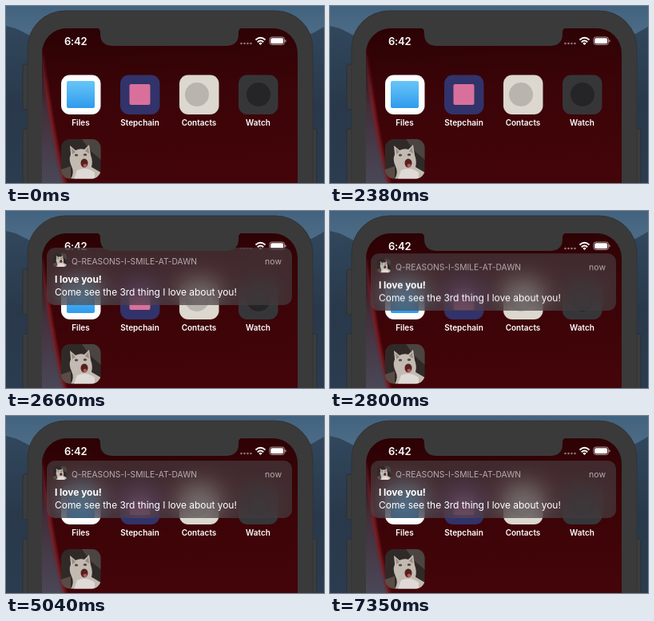
These frames come from a looping animation (398 px wide and 222 px high, 7.42 s). An HTML page:

```html
<!DOCTYPE html>
<html lang="en">
<head>
<meta charset="utf-8">
<title>Phone notification</title>
<style>
  html, body { margin: 0; width: 100%; height: 100%; overflow: hidden; background: #2c4258; }
  .stage { position: relative; width: 398px; height: 222px; overflow: hidden; font-family: Inter, "Liberation Sans", sans-serif; }
  .layer { position: absolute; left: 0; top: 0; width: 398px; height: 222px; display: block; }
  .screen { clip-path: inset(28px 33px 0 45px round 31px 31px 0 0); }
  .label { font-size: 10px; font-weight: 600; fill: #fff; text-anchor: middle; }
  .clock { font-size: 13px; font-weight: 600; fill: #fff; letter-spacing: -.2px; }

  .card {
    position: absolute; left: 51px; top: 56px; width: 307px; height: 72px;
    border-radius: 10px; overflow: hidden; color: #fff;
    background: rgba(70, 66, 69, .63);
    backdrop-filter: blur(15px) saturate(1.2);
    animation: drop 7420ms step-end infinite;
  }
  .card svg { position: absolute; left: 8px; top: 7px; width: 17px; height: 17px; border-radius: 4px; }
  .card span { position: absolute; white-space: pre; line-height: 16px; }
  .app, .when { color: #b3adb0; }
  .app { left: 31px; top: 9px; font-size: 10.3px; }
  .when { right: 13px; top: 10px; font-size: 10.5px; }
  .head { left: 10px; top: 32px; font-size: 12px; font-weight: 700; letter-spacing: -.06px; }
  .text { left: 10px; top: 48px; font-size: 12px; letter-spacing: -.04px; }

  /* decaying slide, one stop every 70 ms */
  @keyframes drop {
    0% { transform: translateY(-130px); }
    33.01% { transform: translateY(-68px); }
    33.96% { transform: translateY(-36px); }
    34.90% { transform: translateY(-19px); }
    35.84% { transform: translateY(-10px); }
    36.79% { transform: translateY(-5.3px); }
    37.73% { transform: translateY(-2.8px); }
    38.67% { transform: translateY(-1.5px); }
    39.62% { transform: translateY(-.8px); }
    40.56% { transform: translateY(-.4px); }
    41.50%, 100% { transform: none; }
  }
</style>
</head>
<body>
<div class="stage">

  <svg class="layer" viewBox="0 0 398 222">
    <defs>
      <linearGradient id="sky" x2="0" y2="1">
        <stop offset="0" stop-color="#42637f"/>
        <stop offset=".14" stop-color="#4b6a85"/>
        <stop offset="1" stop-color="#34465a"/>
      </linearGradient>
      <linearGradient id="hill" x2="0" y2="1">
        <stop offset="0" stop-color="#31475c"/>
        <stop offset=".5" stop-color="#29394b"/>
        <stop offset="1" stop-color="#2c3c50"/>
      </linearGradient>
    </defs>
    <rect width="398" height="222" fill="url(#sky)"/>
    <path d="M0 25L12 28L28 36L40 44V222H0Z" fill="url(#hill)"/>
    <path d="M370 40L384 34L398 26V222H370Z" fill="url(#hill)"/>
    <g fill="#3b3c3e" stroke="#2a2c2f" stroke-width=".8">
      <rect x="21" y="73" width="10" height="57" rx="2"/>
      <rect x="21" y="154" width="10" height="80" rx="2"/>
      <rect x="380" y="154" width="9" height="80" rx="2"/>
    </g>
    <rect x="27" y="6" width="357" height="260" rx="47" fill="#3a3a3b" stroke="#313335"/>
  </svg>

  <div class="layer screen">
    <svg class="layer" viewBox="0 0 398 222">
      <defs>
        <linearGradient id="wall" x2=".1" y2="1">
          <stop offset=".12" stop-color="#2b0204"/>
          <stop offset=".5" stop-color="#3a0408"/>
          <stop offset="1" stop-color="#430509"/>
        </linearGradient>
        <linearGradient id="slate" x2="0" y2="1">
          <stop offset="0" stop-color="#2c0b10"/>
          <stop offset=".45" stop-color="#432f3a"/>
          <stop offset="1" stop-color="#4a4757"/>
        </linearGradient>
        <linearGradient id="glow" x2="0" y2="1">
          <stop offset="0" stop-color="#801a20" stop-opacity="0"/>
          <stop offset=".4" stop-color="#801a20"/>
          <stop offset="1" stop-color="#7a1a20"/>
        </linearGradient>
        <linearGradient id="blue" x2="0" y2="1">
          <stop offset="0" stop-color="#68c5f8"/>
          <stop offset="1" stop-color="#2f9bee"/>
        </linearGradient>
        <filter id="soft" x="-1" width="3"><feGaussianBlur stdDeviation="1.5"/></filter>
        <symbol id="cat" viewBox="0 0 50 50">
          <rect width="50" height="50" fill="#2f2a28"/>
          <path d="M26 0H50V26L36 14Z" fill="#4b4440"/>
          <path d="M0 38L12 34V50H0Z" fill="#5a4c45"/>
          <path d="M11 8L18 14Q24 11 29 13L35 7L37 20Q40 28 38 35L50 42V50H12Q17 42 13 34Q9 26 12 19Z" fill="#c3bab2"/>
          <path d="M13 11L18 16L14 19ZM34 10L30 15L35 18Z" fill="#9c8b84"/>
          <path d="M20 39Q32 34 42 42V50H16Z" fill="#dfdad6"/>
          <ellipse cx="19" cy="20" rx="2.2" ry="1.5" fill="#4d4b45"/>
          <ellipse cx="30" cy="19.500" rx="2.2" ry="1.500" fill="#4d4b45"/>
          <ellipse cx="29" cy="30" rx="4.500" ry="5.500" fill="#55211f"/>
          <ellipse cx="30" cy="33" rx="2.500" ry="2" fill="#b25a58"/>
        </symbol>
        <clipPath id="photo"><rect x="69" y="167" width="49.500" height="49.500" rx="11"/></clipPath>
      </defs>

      <rect width="398" height="222" fill="url(#wall)"/>
      <path d="M45 50Q53 140 73 222H45Z" fill="url(#slate)"/>
      <path d="M45 50Q53 140 74 224" fill="none" stroke="url(#glow)" stroke-width="4" filter="url(#soft)"/>

      <text class="clock" x="73" y="49">6:42</text>
      <g fill="#8d7478">
        <circle cx="294.500" cy="47" r="1.300"/><circle cx="298.500" cy="47" r="1.300"/>
        <circle cx="302.500" cy="47" r="1.300"/><circle cx="306.500" cy="47" r="1.300"/>
      </g>
      <g fill="none" stroke="#fff" stroke-width="2">
        <path d="M312.500 42.500Q318.500 37 324.500 42.500"/>
        <path d="M314.800 45.200Q318.500 41.800 322.200 45.200"/>
      </g>
      <path d="M316.300 46.700Q318.500 45 320.700 46.700L318.500 49Z" fill="#fff"/>
      <rect x="330" y="39" width="18.500" height="9.500" rx="2.800" fill="none" stroke="#b9a4a6" stroke-width=".9"/>
      <rect x="331.300" y="40.300" width="15.900" height="6.900" rx="1.700" fill="#fff"/>
      <rect x="349.300" y="42.300" width="1.200" height="3" rx=".6" fill="#b9a4a6"/>

      <rect x="69" y="86.500" width="49.500" height="49.500" rx="11" fill="#fdfdfd"/>
      <rect x="76" y="94" width="35" height="34" rx="2" fill="url(#blue)"/>
      <rect x="143" y="86.500" width="49.500" height="49.500" rx="11" fill="#31336a"/>
      <rect x="154.500" y="98" width="26" height="26" rx="2" fill="#d8709b"/>
      <rect x="217" y="86.500" width="49.500" height="49.500" rx="11" fill="#dcd7cf"/>
      <circle cx="239" cy="111" r="15" fill="#b9b4ad"/>
      <rect x="291" y="86.500" width="49.500" height="49.500" rx="11" fill="#363638"/>
      <circle cx="316" cy="111" r="15" fill="#252527"/>
      <g clip-path="url(#photo)"><use href="#cat" x="69" y="167" width="50" height="50"/></g>

      <g class="label">
        <text x="93.500" y="150">Files</text>
        <text x="167.500" y="150">Stepchain</text>
        <text x="241.500" y="150">Contacts</text>
        <text x="315.500" y="150">Watch</text>
      </g>
    </svg>

    <div class="card">
      <svg viewBox="0 0 50 50"><use href="#cat" width="50" height="50"/></svg>
      <span class="app">Q-REASONS-I-SMILE-AT-DAWN</span>
      <span class="when">now</span>
      <span class="head">I love you!</span>
      <span class="text">Come see the 3rd thing I love about you!</span>
    </div>
  </div>

  <svg class="layer" viewBox="0 0 398 222">
    <path d="M113 27.500Q118 28 118 33V35Q118 50 134 50H275Q291 50 291 35V33Q291 28 296 27.500Z" fill="#3a3a3b"/>
  </svg>
</div>
</body>
</html>
```
